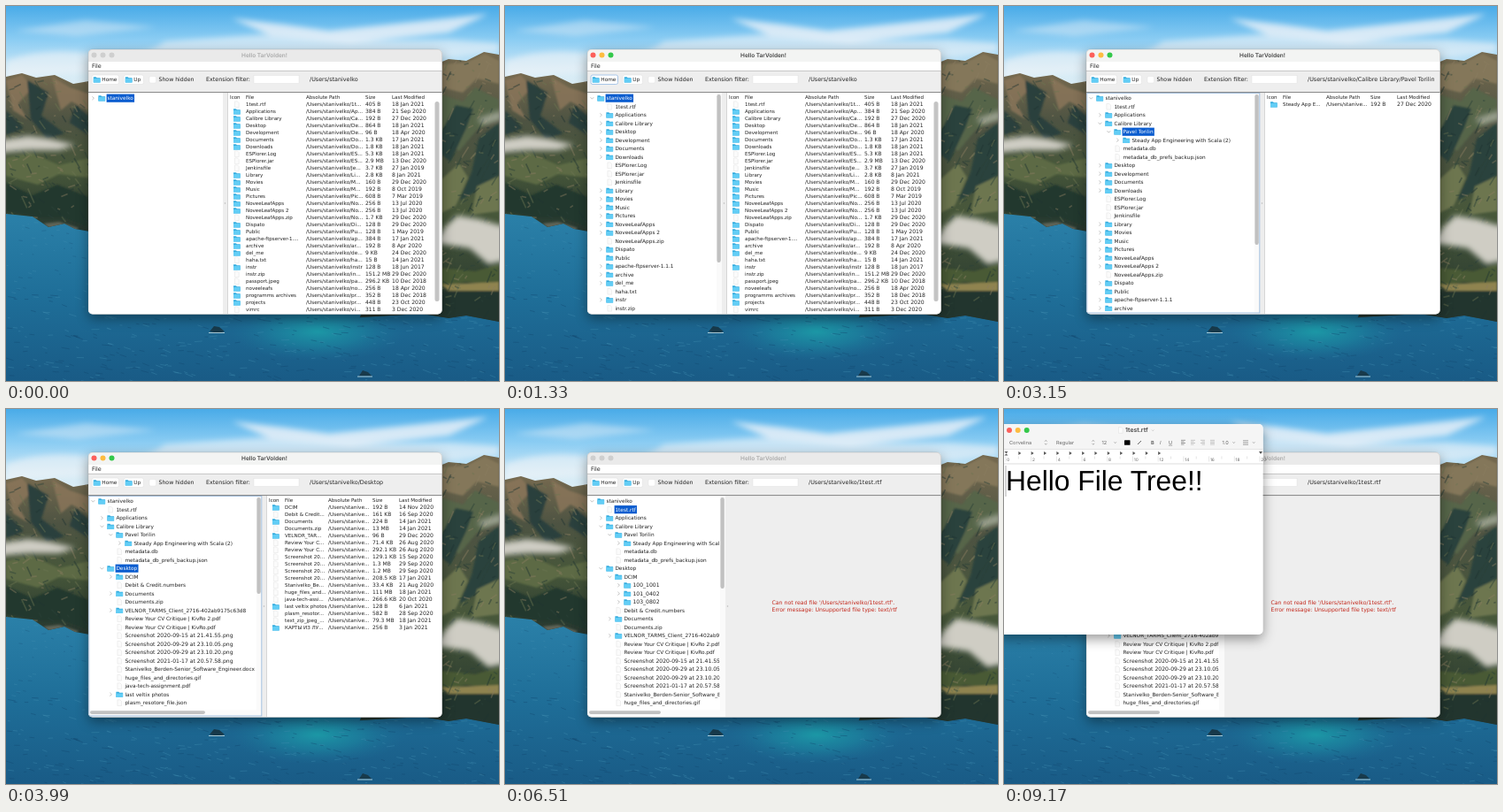
Animation of 557x424 px, one loop 9240 ms. Source, as an HTML page:

```html
<!DOCTYPE html>
<html lang="en">
<head>
<meta charset="utf-8">
<title>File tree demo</title>
<style>
html, body { margin: 0; width: 100%; height: 100%; overflow: hidden; background: #1d6a96; }
svg { display: block; width: 100vw; height: 100vh; }
text { font-family: "DejaVu Sans", sans-serif; white-space: pre; text-rendering: geometricPrecision; }
.bar { font-family: Inter, sans-serif; }
.page { font-family: "Liberation Sans", Arial, sans-serif; }
</style>
</head>
<body>
<svg viewBox="0 0 557 424" preserveAspectRatio="none" xmlns="http://www.w3.org/2000/svg">
  <defs>
    <linearGradient id="sky" x2="0" y2="1">
      <stop offset="0" stop-color="#49abe8"/><stop offset=".35" stop-color="#8ccdf3"/><stop offset=".7" stop-color="#d5ebf6"/><stop offset="1" stop-color="#e6eff2"/>
    </linearGradient>
    <linearGradient id="sea" x2="0" y2="1">
      <stop offset="0" stop-color="#2c82aa"/><stop offset=".5" stop-color="#1f6f99"/><stop offset="1" stop-color="#195b86"/>
    </linearGradient>
    <radialGradient id="teal">
      <stop offset="0" stop-color="#1c98a6"/><stop offset=".5" stop-color="#1c89a2" stop-opacity=".6"/><stop offset="1" stop-color="#1d7299" stop-opacity="0"/>
    </radialGradient>
    <linearGradient id="hill" x2="0" y2="1">
      <stop offset="0" stop-color="#75694f"/><stop offset=".3" stop-color="#4d5342"/><stop offset=".6" stop-color="#47573a"/><stop offset="1" stop-color="#25352e"/>
    </linearGradient>
    <filter id="soft" x="-30%" y="-60%" width="160%" height="220%"><feGaussianBlur stdDeviation="3"/></filter>
    <filter id="edge"><feGaussianBlur stdDeviation="1"/></filter>
    <filter id="shade" x="-20%" y="-20%" width="140%" height="150%"><feDropShadow dx="0" dy="5" stdDeviation="7" flood-opacity=".4"/></filter>
    <clipPath id="frame"><rect x="93" y="49" width="399.5" height="299.5" rx="5"/></clipPath>
    <clipPath id="pane"><rect id="paneBox" x="93" y="98" height="250"/></clipPath>
    <clipPath id="land">
      <path id="west" d="M0 80 18 76 34 81 55 78 76 88 100 84V256L78 252 66 246 48 250 30 238 0 235Z"/>
      <path id="east" d="M480 68 500 60 520 62 540 52 557 55V357L520 350 500 353 470 348 400 352Z"/>
    </clipPath>
  </defs>
  <g id="wall">
    <rect width="557" height="110" fill="url(#sky)"/>
    <g fill="#f6f6f8" filter="url(#soft)">
      <path d="M0 62Q45 46 98 54T180 40L290 32 390 40 500 38 557 42V52L470 62 200 70 0 80Z" opacity=".55"/>
      <path d="M255 14Q310 20 365 28L460 18 545 9 500 30 390 42 300 34Z" opacity=".75"/>
      <path d="M10 28 90 16 170 24 80 34Z" opacity=".4"/>
    </g>
    <rect y="225" width="557" height="199" fill="url(#sea)"/>
    <ellipse cx="352" cy="368" rx="100" ry="34" fill="url(#teal)"/>
    <g id="waves"></g>
    <use href="#west" fill="url(#hill)"/><use href="#east" fill="url(#hill)"/>
    <g clip-path="url(#land)">
      <g filter="url(#edge)">
        <path d="M0 84 18 78 30 92 14 110 24 128 8 118Z M52 80 72 92 93 99V118L74 108 62 118Z" fill="#8d775c" opacity=".8"/>
        <path d="M24 84 48 98 40 124 66 144 46 150 28 128Z M0 118 20 138 0 146Z M78 112 93 124V146L72 132Z" fill="#2c3f3c"/>
        <path d="M0 172 28 166 60 180 93 172V194L60 190 36 202 0 192Z" fill="#5d6b45"/>
        <path d="M0 200 30 214 58 202 93 216V250L66 240 40 240 0 232Z" fill="#24382d"/>
        <path d="M42 246 60 244 82 251 78 255 50 252Z" fill="#5f6456"/>
        <path d="M492 66 520 64 541 54 557 62V88L532 82 516 98 492 92Z" fill="#84775a"/>
        <path d="M492 100 516 108 530 92 557 106V128L532 140 512 164 492 150Z" fill="#566549"/>
        <path d="M508 112 528 116 520 138 502 176 492 168V142Z M557 132 534 150 526 188 512 220 557 196Z" fill="#2b423d"/>
        <path d="M492 196 512 178 522 194 508 226 492 234Z M532 204 557 192V232L526 236Z" fill="#6d7650"/>
        <path d="M492 296 530 300 557 292V316L520 312 492 318Z" fill="#4a5a35"/>
        <path d="M492 315 557 312V322L500 322Z" fill="#8f8350"/>
        <path d="M400 352 492 323 557 322V357L520 350 500 353 470 348Z" fill="#22342f"/>
      </g>
      <g id="ridges"></g>
    </g>
    <g filter="url(#soft)" fill="#cfcdc4">
      <path d="M-8 152 25 147 48 150 78 157 60 163 25 163-8 166Z"/>
      <path d="M496 250 510 237 534 241 565 250V288L545 292 524 274 485 268Z"/>
      <path d="M532 128 560 118V128L540 134Z" opacity=".6"/>
    </g>
    <path d="M230 368 235 362 241 363 247 368 240 370Z M399 418 403 412 409 414 413 418Z" fill="#183a4b"/>
    <path d="M229 369.5h18M397 419h17" stroke="#a8c9d5"/>
  </g>
  <g id="app"></g>
  <g id="editor"></g>
</svg>
<script>
const LOOP = 9240, USER = 'stanivelko', HOME = '/Users/' + USER;
const $ = id => document.getElementById(id);
const lines = s => s.trim().split('\n');

// depth, then + folder, - empty folder or . file
const tree = lines(`
0+${USER}
1.1test.rtf
1+Applications
1+Calibre Library
2+Pavel Torilin
3+Steady App Engineering with Scala (2)
2.metadata.db
2.metadata_db_prefs_backup.json
1+Desktop
2+DCIM
3+100_1001
3+101_0402
3+103_0802
2.Debit & Credit.numbers
2+Documents
2.Documents.zip
2+VELNOR_TARMS_Client_2716-402ab9175c63d8
2.Review Your CV Critique | KivRo 2.pdf
2.Review Your CV Critique | KivRo.pdf
2.Screenshot 2020-09-15 at 21.41.55.png
2.Screenshot 2020-09-29 at 23.10.05.png
2.Screenshot 2020-09-29 at 23.10.20.png
2.Screenshot 2021-01-17 at 20.57.58.png
2.Stanivelko_Berden-Senior_Software_Engineer.docx
2.huge_files_and_directories.gif
2.java-tech-assignment.pdf
2+last veltix photos
2.plasm_resotore_file.json
1+Development
1+Documents
1+Downloads
1.ESPlorer.Log
1.ESPlorer.jar
1.Jenkinsfile
1+Library
1+Movies
1+Music
1+Pictures
1+NoveeLeafApps
1+NoveeLeafApps 2
1.NoveeLeafApps.zip
1+Dispato
1-Public
1+apache-ftpserver-1.1.1
1+archive
1+del_me
1.haha.txt
1+instr
1.instr.zip`).map(s => ({ depth: +s[0], kind: s[1], name: s.slice(2) }));

const tables = {
  home: lines(`
.1test.rtf|405 B|18 Jan 2021
+Applications|384 B|21 Sep 2020
+Calibre Library|192 B|27 Dec 2020
+Desktop|864 B|18 Jan 2021
+Development|96 B|18 Apr 2020
+Documents|1.3 KB|17 Jan 2021
+Downloads|1.8 KB|18 Jan 2021
.ESPlorer.Log|5.3 KB|18 Jan 2021
.ESPlorer.jar|2.9 MB|13 Dec 2020
.Jenkinsfile|3.7 KB|27 Jan 2019
+Library|2.8 KB|8 Jan 2021
+Movies|160 B|29 Dec 2020
+Music|192 B|8 Oct 2019
+Pictures|608 B|7 Mar 2019
+NoveeLeafApps|256 B|13 Jul 2020
+NoveeLeafApps 2|256 B|13 Jul 2020
.NoveeLeafApps.zip|1.7 KB|29 Dec 2020
+Dispato|128 B|29 Dec 2020
+Public|128 B|1 May 2019
+apache-ftpserver-1....|384 B|17 Jan 2021
+archive|192 B|8 Apr 2020
+del_me|9 KB|24 Dec 2020
.haha.txt|15 B|14 Jan 2021
+instr|128 B|18 Jun 2017
.instr.zip|151.2 MB|29 Dec 2020
.passport.jpeg|296.2 KB|10 Dec 2018
+noveeleafs|256 B|18 Apr 2020
+programms archives|352 B|18 Dec 2018
+projects|448 B|23 Oct 2020
.vimrc|311 B|3 Dec 2020`),
  library: lines(`
+Pavel Torilin|128 B|27 Dec 2020
.metadata.db|348 KB|21 May 2020
.metadata_db_prefs_...|13.2 KB|21 May 2020`),
  author: ['+Steady App E...|192 B|27 Dec 2020'],
  desktop: lines(`
+DCIM|192 B|14 Nov 2020
.Debit & Credit...|161 KB|16 Sep 2020
+Documents|224 B|14 Jan 2021
.Documents.zip|13 MB|14 Jan 2021
+VELNOR_TAR...|96 B|29 Dec 2020
.Review Your C...|71.4 KB|26 Aug 2020
.Review Your C...|292.1 KB|26 Aug 2020
.Screenshot 20...|129.1 KB|15 Sep 2020
.Screenshot 20...|1.3 MB|29 Sep 2020
.Screenshot 20...|1.2 MB|29 Sep 2020
.Screenshot 20...|208.5 KB|17 Jan 2021
.Stanivelko_Be...|33.4 KB|21 Aug 2020
.huge_files_and...|111 MB|18 Jan 2021
.java-tech-assi...|266.6 KB|20 Oct 2020
+last veltix photos|128 B|6 Jan 2021
.plasm_resotor...|582 B|28 Sep 2020
.text_zip_jpeg_...|79.3 MB|18 Jan 2021
+КАРТЫ ИЗ ЛУ...|256 B|3 Jan 2021`),
  dcim: lines(`
+100_1001|4.3 KB|6 Jun 2020
+101_0402|960 B|6 Jun 2020
+103_0802|2.4 KB|6 Jun 2020`)
};

// columns: icon, file, path, size, date; then the room for a path
const narrow = { edge: 245, cols: [253, 271, 339, 406, 436], room: 64.8 };
const middle = { edge: 249, cols: [256, 274, 344, 414, 443], room: 67 };
const wide = { edge: 289, cols: [297, 315, 364, 414, 444], room: 47 };

const top0 = [USER], lib = [USER, 'Calibre Library'], author = [...lib, 'Pavel Torilin'];
const desk = [...author, 'Desktop'], dcim = [...desk, 'DCIM'];
const scenes = [
  { at: 0, open: [], sel: USER, path: '', lay: narrow, rows: 'home' },
  { at: 1190, open: top0, sel: USER, path: '', lay: narrow, rows: 'home', active: 1, home: 1, vbar: 190 },
  { at: 1820, open: lib, sel: 'Calibre Library', path: '/Calibre Library', lay: middle, rows: 'library', active: 1, home: 1, vbar: 177 },
  { at: 2660, open: author, sel: 'Pavel Torilin', path: '/Calibre Library/Pavel Torilin', lay: wide, rows: 'author', active: 1, focus: 1, vbar: 170 },
  { at: 3500, open: desk, sel: 'Desktop', path: '/Desktop', lay: wide, rows: 'desktop', active: 1, focus: 1, vbar: 109, hbar: 130 },
  { at: 4550, open: dcim, sel: 'DCIM', path: '/Desktop/DCIM', lay: wide, rows: 'dcim', active: 1, focus: 1, vbar: 103, hbar: 130 },
  { at: 5740, open: dcim, sel: '1test.rtf', path: '/1test.rtf', lay: middle, active: 1, vbar: 103, hbar: 81 },
  { at: 6370, open: dcim, sel: '1test.rtf', path: '/1test.rtf', lay: middle, vbar: 103, hbar: 81 },
  { at: 7070, open: dcim, sel: '1test.rtf', path: '/1test.rtf', lay: middle, vbar: 103, hbar: 81, editor: 1 }
];

const esc = s => String(s).replace(/&/g, '&amp;').replace(/</g, '&lt;');
const text = (x, y, s, size = 5.75, fill = '#222', extra = '') =>
  `<text x="${x}" y="${y}" font-size="${size}" fill="${fill}" ${extra}>${esc(s)}</text>`;
const rect = (x, y, w, h, fill, rx = 0, extra = '') =>
  `<rect x="${x}" y="${y}" width="${w}" height="${h}" rx="${rx}" fill="${fill}" ${extra}/>`;
const line = (d, stroke, w = .6) => `<path d="${d}" fill="none" stroke="${stroke}" stroke-width="${w}"/>`;
const lights = (xs, y, on) => xs.map((x, i) =>
  `<circle cx="${x}" cy="${y}" r="3" fill="${on ? ['#fc605b', '#fdbc40', '#34c84a'][i] : '#cfcfcf'}"/>`).join('');

const folder = (x, y) =>
  `<path d="M${x} ${y - 2.9}h3l.8.9h3.9v5.3h-7.7z" fill="#36addf"/>` + rect(x, y - 1.3, 7.7, 4.6, '#62cdf5', .5);
const sheet = (x, y) =>
  `<path d="M${x + 1.5} ${y - 3.3}h3l1.7 1.7v5h-4.7z" fill="#fbfbfb" stroke="#d8d8d8" stroke-width=".4"/>`;
const icon = (kind, x, y) => kind === '.' ? sheet(x, y) : folder(x, y);
const nameSize = s => /\d{4}-\d\d-|^\d+_/.test(s) ? 6.1 : 5.8;

const pen = document.createElement('canvas').getContext('2d');
const width = (s, size = 5.75) => {
  pen.font = '100px "DejaVu Sans", sans-serif';
  return pen.measureText(s).width * size / 100;
};
function fit(s, room) {
  if (width(s) <= room) return s;
  while (width(s + '...') > room) s = s.slice(0, -1);
  return s + '...';
}

function visible(open) {
  const trail = [];
  return tree.filter(n => {
    trail.length = n.depth;
    const shown = trail.every(p => open.includes(p));
    trail.push(n.name);
    return shown;
  });
}

function drawTree(s) {
  let out = rect(93, 98, s.lay.edge - 93, 250, '#fff');
  const rows = visible(s.open).slice(0, s.hbar ? 25 : 26);
  out += '<g clip-path="url(#pane)">' + rows.map((n, i) => {
    const x = 104.4 + n.depth * 10, y = 104.2 + i * 9.5, size = nameSize(n.name);
    const on = n.name === s.sel;
    const chevron = s.open.includes(n.name) ? `M${x - 7.8} ${y - 1}l1.8 2 1.8-2` : `M${x - 7} ${y - 1.9}l2 1.9-2 1.9`;
    return (n.kind === '+' ? line(chevron, '#999') : '') + icon(n.kind, x, y) +
      (on ? rect(x + 9.2, y - 4.6, width(n.name, size) + 2, 9.2, '#0a5ccf') : '') +
      text(x + 10, y + 2.1, n.name, size, on ? '#fff' : '#222');
  }).join('') + '</g>';
  if (s.vbar) out += rect(s.lay.edge - 6, 98, 6, 250, '#fafafa') + rect(s.lay.edge - 5.6, 100, 4.4, s.vbar, '#c1c1c1', 2.2);
  if (s.hbar) out += rect(93, 340.5, s.lay.edge - 93, 7.5, '#fafafa') + rect(95, 341.3, s.hbar, 3.6, '#c1c1c1', 1.8);
  return out;
}

function drawTable(s) {
  const { edge, cols, room } = s.lay;
  const heads = ['Icon', 'File', 'Absolute Path', 'Size', 'Last Modified'];
  let out = rect(edge + 5, 98, 493 - edge, 250, '#fff') + line(`M${edge + 5.3} 98V348`, '#999', .5);
  out += heads.map((h, i) => text(cols[i], 105.2, h, 5.55)).join('');
  out += tables[s.rows].map((row, i) => {
    const [label, size, date] = row.split('|'), y = 111.2 + i * 8, name = label.slice(1);
    return icon(label[0], cols[0] + 4, y) + text(cols[1], y + 2.1, name, nameSize(name) - .25) +
      text(cols[2], y + 2.1, fit(`${HOME}${s.path}/${name}`, room)) +
      text(cols[3], y + 2.1, size, 6) + text(cols[4], y + 2.1, date, 6.1);
  }).join('');
  if (s.rows === 'home') out += rect(484.5, 108, 5, 226, '#c4c4c4', 2.5);
  return out;
}

function drawError() {
  return text(301.5, 221.2, `Can not read file '${HOME}/1test.rtf'.`, 6.2, '#c3271b') +
    text(301.5, 229.3, 'Error message: Unsupported file type: text/rtf', 6.2, '#c3271b');
}

function drawButton(x, w, label, ring) {
  return rect(x, 78, w, 10.5, '#fff', 2, ring ? 'stroke="#a9c6e8" stroke-width="1"' : 'stroke="#dcdcdc" stroke-width=".5"') +
    folder(x + 1.8, 83.2) + text(x + 11.3, 85.4, label, 5.8);
}

function drawApp(s) {
  const { edge } = s.lay;
  $('paneBox').setAttribute('width', edge - 93 - (s.vbar ? 6.5 : 0));
  return rect(93, 49, 399.5, 299.5, '#eee', 5, 'filter="url(#shade)"') +
    '<g clip-path="url(#frame)">' +
    rect(93, 49, 400, 300, '#eee') +
    rect(93, 49, 400, 14, s.active ? '#f3f4f3' : '#eaeaea') +
    lights([99.5, 109.5, 119.5], 55.6, s.active) +
    text(292, 58, 'Hello TarVolden!', 6.5, s.active ? '#444' : '#aaa', 'class="bar" font-weight="600" text-anchor="middle"') +
    rect(93, 63, 400, 10, '#fff') + text(97, 70.4, 'File', 6.4) + line('M93 73.4H493', '#aaa') +
    drawButton(97, 30.5, 'Home', s.home) + drawButton(133, 22.5, 'Up') +
    rect(162, 79.5, 7.5, 7.5, '#fff', 1.5, 'stroke="#ddd" stroke-width=".4"') +
    text(172.5, 85.4, 'Show hidden', 6.2) + text(226, 85.4, 'Extension filter:', 6.35) +
    rect(280, 78.5, 51, 9, '#fff', 0, 'stroke="#ddd" stroke-width=".4"') +
    text(343, 85.4, HOME + s.path, 6.4) +
    drawTree(s) + (s.rows ? drawTable(s) : drawError()) +
    rect(edge, 98, 5, 250, '#eee') + `<circle cx="${edge + 2.5}" cy="223" r=".8" fill="#bbb"/>` +
    (s.focus ? `<rect x="93.8" y="98.5" width="${edge - 94}" height="248.5" fill="none" stroke="#a3c0e0"/>` : '') +
    line('M93 97.6H493', '#777', .9) + '</g>' +
    '<rect x="93" y="49" width="399.5" height="299.5" rx="5" fill="none" stroke="#888" stroke-opacity=".5" stroke-width=".5"/>';
}

function drawEditor() {
  const grey = '#666', bar = (x, y, s, size = 5.6, more = '') => text(x, y, s, size, grey, 'class="bar" ' + more);
  const arrows = x => line(`M${x} 36.8l1.3-1.5 1.3 1.5M${x} 38.8l1.3 1.5 1.3-1.5`, grey, .5);
  const down = x => line(`M${x} 37.3l1.2 1.3 1.2-1.3`, grey, .5);
  let out = rect(-8, 17, 300.5, 238, '#fff', 5, 'filter="url(#shade)"') +
    '<path d="M-8 62V17H287.5q5 0 5 5V62z" fill="#f5f5f5"/>' +
    lights([6, 15.7, 25.7], 24, 1) + sheet(128, 24) +
    text(137, 26.2, '1test.rtf', 6.9, '#444', 'class="bar" font-weight="600"') +
    line('M167 23.5l1.2 1.3 1.2-1.3', '#aaa', .5);
  out += bar(6, 39.6, 'Corvelina') + arrows(46) + bar(59, 39.6, 'Regular') + arrows(99.5) +
    bar(110.5, 39.6, '12') + down(124.5) + rect(136, 35.2, 6.5, 5.5, '#000', .5) +
    line('M151 40l4-4', grey, 1) +
    bar(166, 39.8, 'B', 5.6, 'font-weight="700"') + bar(176, 39.8, 'I', 5.6, 'font-style="italic"') +
    bar(186, 39.8, 'U', 5.6, 'text-decoration="underline"');
  [200, 211, 222, 233].forEach((x, i) => {
    out += line([0, 1, 2, 3].map(k => `M${x + (i === 2 && k % 2 ? 1.5 : 0)} ${35.3 + k * 1.6}h${k % 2 && i < 3 ? 3.5 : 5}`).join(''), i ? '#aaa' : grey, .6);
  });
  out += bar(246.5, 39.6, '1.0') + down(258.5) + line('M270 35.8h6M270 38h6M270 40.2h6', grey, .6) + down(281);
  out += line('M0 45.5H292.5M0 61.8H292.5', '#d4d4d4', .5) + rect(0, 46, 292.5, 15.6, '#fff');
  for (let i = 0; i <= 20; i++) {
    const x = 2 + i * 14.35;
    out += line(`M${x} 53.5v${i % 2 ? 3 : 6}`, '#bbb', .4);
    if (i % 2 === 0) out += bar(x + 1.3, 59.2, i, 4.8);
    if (i && i < 13) out += `<path d="M${x} 48l3 2-3 2z" fill="#555"/>`;
  }
  out += '<path d="M.5 48h4l-2 2.2zM.5 52.6h4l-2-2.2zM288 48h4l-2 3z" fill="#555"/>';
  return out + line('M0 62H292.5', '#d0d0d0', .5) + line('M2 64V99', '#777', .6) +
    text(2, 92, 'Hello File Tree!!', 31.8, '#000', 'class="page"');
}

let seed = 7;
const rnd = () => (seed = seed * 16807 % 2147483647) / 2147483647;

// seeded strokes inside a box, leaning by (dx, dy)
function streaks(n, [x, y, w, h], dx, dy, colors, thick, opacity) {
  let out = '';
  for (let i = 0; i < n; i++) {
    const k = .3 + rnd(), start = [x + rnd() * w, y + rnd() * h];
    const end = [dx * k, dy * k * (rnd() * 2 - .5)].map(v => v.toFixed(1));
    out += `<path d="M${start.map(v => v.toFixed(1))}l${end}" stroke="${colors[i % colors.length]}" stroke-width="${thick}" stroke-opacity="${opacity}"/>`;
  }
  return out;
}

function drawWall() {
  const rock = ['#1f3332', '#8a7c60', '#2c4038', '#6c7350'];
  $('waves').innerHTML = streaks(260, [0, 238, 557, 90], 4, 1, ['#4590b2', '#165079'], .8, .4) +
    streaks(420, [0, 325, 557, 99], 7, 2, ['#3f8cae', '#12466f'], 1, .4);
  $('ridges').innerHTML = streaks(150, [0, 82, 93, 165], 6, 9, rock, 1.6, .45) +
    streaks(170, [490, 60, 67, 285], -6, 10, rock, 1.6, .45);
}

let shown = null;
function update() {
  const t = performance.now() % LOOP;
  const scene = scenes.filter(s => s.at <= t).pop();
  if (scene !== shown) {
    shown = scene;
    $('app').innerHTML = drawApp(scene);
    $('editor').innerHTML = scene.editor ? drawEditor() : '';
  }
  requestAnimationFrame(update);
}
drawWall();
update();
</script>
</body>
</html>
```
